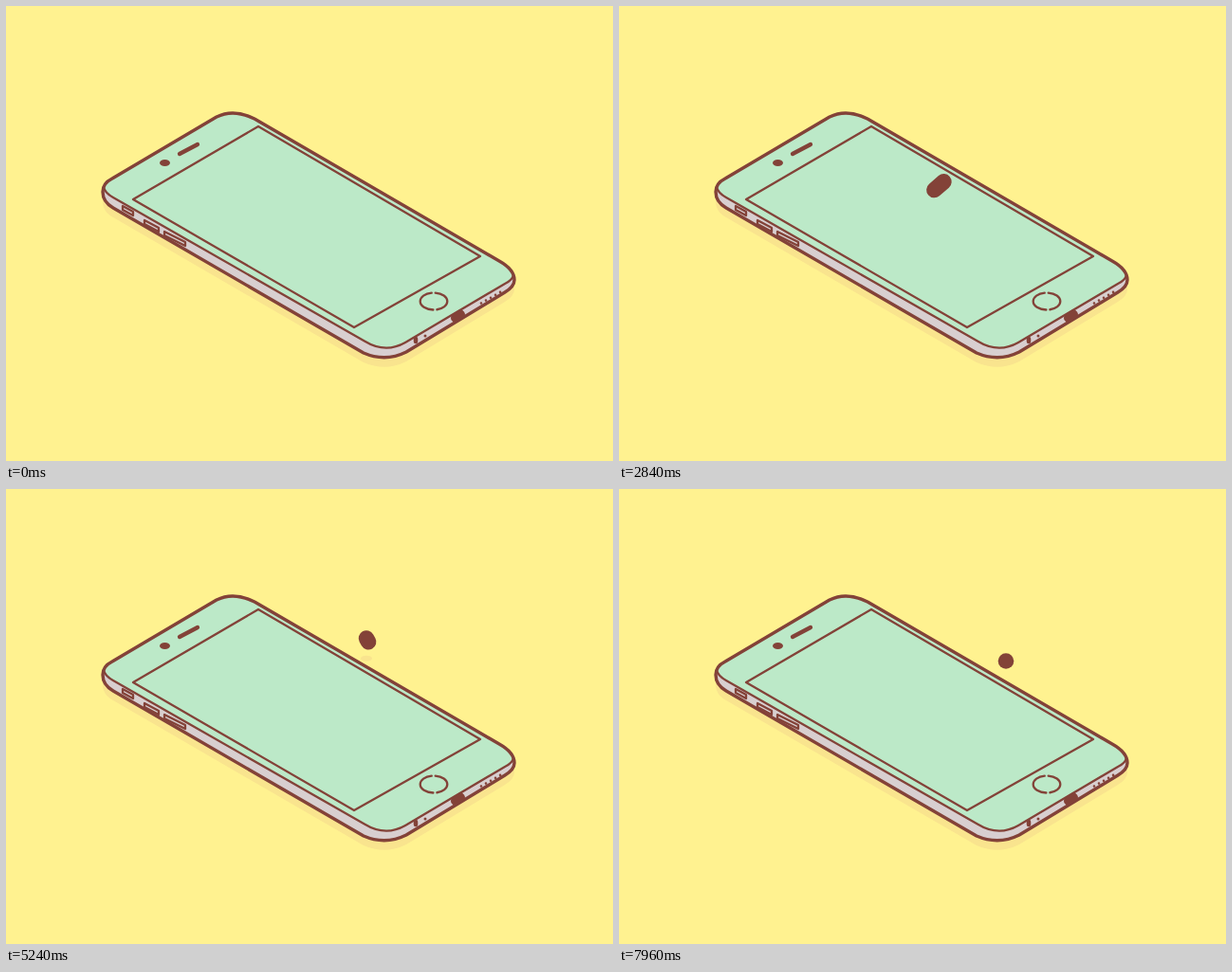
An HTML page that plays this animation: 640x480 px, repeating every 8 s.

```html
<!DOCTYPE html>
<html>
<head>
<meta charset="utf-8">
<style>
html, body { margin: 0; width: 100%; height: 100%; overflow: hidden; background: #fff290; }
svg { display: block; width: 100vw; height: 100vh; }
.line { fill: none; stroke: #834238; stroke-linecap: round; stroke-linejoin: round; stroke-width: 2.3; }
.dark { fill: #834238; }
</style>
</head>
<body>
<svg viewBox="0 0 640 480">
  <defs>
    <path id="screenShape" d="M266 127L500 264L367 339L134 204Z"/>
    <path id="body" d="M112 182L222 117Q240 108 262 119L520 269Q536 278 536 289Q536 296 526 302L422 365Q400 376 377 366L113 213C106 209 102 204 102 196Q102 187 112 182Z"/>
    <clipPath id="screenClip"><use href="#screenShape"/></clipPath>
  </defs>
  <use href="#body" y="10" fill="#f9e48e"/>
  <use href="#body" fill="#d8cfd0"/>
  <path fill="#bce9c8" d="M112 182L222 117Q240 108 262 119L520 269Q535 278 535 284Q534 289 526 293L421 355Q400 367 378 353.500L113 202Q104 197 103 191Q104 186 112 182Z"/>
  <path class="line" d="M103 191Q104 197 113 202L378 353.500Q400 367 421 355L526 293Q534 289 535 284"/>
  <g clip-path="url(#screenClip)">
    <ellipse id="blue" cx="332" cy="195" fill="#9bc9d6"/>
    <ellipse id="green" cx="332" cy="195" fill="#bce9c8"/>
  </g>
  <use href="#screenShape" class="line"/>
  <use href="#body" class="line" style="stroke-width:3.4"/>
  <ellipse class="dark" cx="167.500" cy="165.500" rx="5.500" ry="3.500"/>
  <path class="line" style="stroke-width:4.300" d="M183 156L202 146"/>
  <ellipse class="line" cx="451" cy="311.500" rx="14.300" ry="9" stroke-dasharray="15 4 34 4 17"/>
  <path class="line" style="stroke-width:10" d="M474 329L479 325.500"/>
  <path class="line" style="stroke-width:4.500" d="M432 351V354"/>
  <circle class="dark" cx="442" cy="348" r="1.500"/>
  <path class="line" style="stroke-dasharray:0 5.800;stroke-width:2.600" d="M501 313.500L526 299"/>
  <path class="line" d="M123 211V215L134 221V217ZM146 226V230L161 238V234ZM167 238V242L189 253V249Z"/>
  <ellipse id="shade" rx="6" ry="3" fill="#f9e48e"/>
  <path id="ball" class="line" style="stroke-width:16.600"/>
  <ellipse id="squash" class="dark" cx="486" rx="8.500"/>
</svg>
<script>
const $ = id => document.getElementById(id);
const LOOP = 8000, FLIGHT = 360, LANDINGS = [525, 3200, 5876];
const HOP = 225, HOP_START = 586, JUMP = 1953;
const arc = f => 4 * f * (1 - f);
const track = x => 110 + (486 - x) * 0.573;
const cycle = t => LANDINGS.findLastIndex(l => t >= l - FLIGHT);

function set(id, attrs) {
  for (const k in attrs) $(id).setAttribute(k, attrs[k]);
}

// Point on the diagonal track, lifted by h
const at = (x, h = 0) => ({ x, h, y: track(x) - h });

function place(t) {
  const n = cycle(t), p = t - LANDINGS[n];
  if (p < 0) {
    const f = 1 + p / FLIGHT, up = 0.647;
    const y = 77 + (f < up ? 118 : 33) * ((f - up) / (f < up ? up : 1 - up)) ** 2;
    return { x: 332 + 154 * f, y, h: 0 };
  }
  if (p < 90) return at(486);
  if (p < 290) return at(486, 7 * arc((p - 90) / 200));
  if (p < 430) return at(486, 3 * arc((p - 290) / 140));
  if (p < HOP_START) return at(486);
  const k = (p - HOP_START) / HOP;
  if (k < 4) return at(383 + 103 * (1 - k / 4) ** 1.08, 16 * arc(k % 1));
  if (p < 1680) return at(383, 4 * arc((k - 4) * HOP / (1680 - HOP_START - 4 * HOP)));
  if (n == 2) {
    const f = Math.min(1, Math.max(0, (p - 1875) / 165));
    return { x: 383 + 25 * f, y: 169 + 12.5 * f - 16 * arc(f), h: 0 };
  }
  const f = Math.max(0, (p - JUMP) / (2315 - JUMP));
  return at(383 - 51 * f ** 2, 18 * arc(f));
}

function ripple(id, u) {
  const rx = Math.min(400, 40 * 3.9 ** (u / 40));
  set(id, { rx, ry: rx * 0.555 });
}

const show = (id, on) => $(id).style.display = on ? "" : "none";

function draw(t) {
  const p = t - LANDINGS[cycle(t)];
  // Green follows blue across the screen
  const hit = LANDINGS.slice(1).find(l => t < l + 100) ?? LOOP * 2;
  ripple("blue", t - hit + 160);
  ripple("green", t - hit);

  const shown = t >= 200, flat = shown && p >= -5 && p < 90;
  show("ball", shown && !flat);
  show("squash", flat);
  show("shade", shown);
  if (!shown) return;

  const b = place(t), a = place(Math.max(200, t - 40));
  const dx = a.x - b.x, dy = a.y - b.y;
  const s = Math.min(1, 18 / (Math.hypot(dx, dy) || 1));
  set("ball", { d: `M${b.x} ${b.y}L${b.x + dx * s} ${b.y + dy * s}` });

  const ry = 6.3 + 2.2 * Math.max(0, (p - 50) / 40);
  set("squash", { cy: 118.5 - ry, ry });
  set("shade", { cx: b.x, cy: b.y + b.h + 8, opacity: Math.min(1, b.h / 5) });
}

function tick() {
  draw(performance.now() % LOOP);
  requestAnimationFrame(tick);
}
tick();
</script>
</body>
</html>
```
